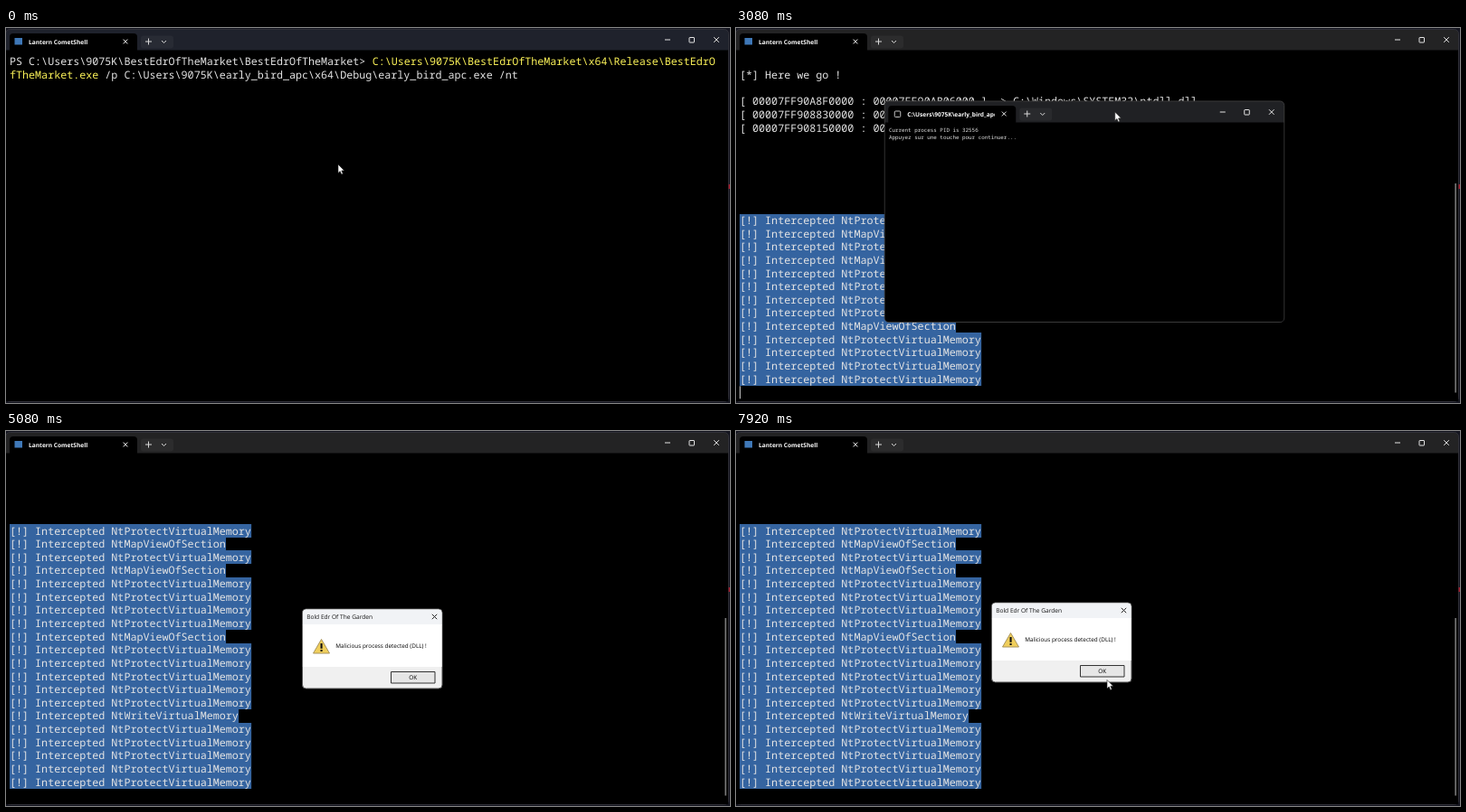
Recreate the animation shown at these times as an HTML page with a canvas. Size 800 by 415 pixels, loop 8000 ms.

```html
<!DOCTYPE html>
<html lang="en">
<head>
<meta charset="utf-8">
<title>Terminal session</title>
<style>
  html, body { margin: 0; width: 100%; height: 100%; overflow: hidden; background: #000; }
  canvas { display: block; width: 800px; height: 415px; }
</style>
</head>
<body>
<canvas id="stage"></canvas>
<script type="text/plain" id="log">
PS C:\Users\9075K\BestEdrOfTheMarket\BestEdrOfTheMarket> C:\Users\9075K\BestEdrOfTheMarket\x64\Release\BestEdrO
fTheMarket.exe /p C:\Users\9075K\early_bird_apc\x64\Debug\early_bird_apc.exe /nt
[*] Spawning C:\Users\9075K\early_bird_apc\x64\Debug\early_bird_apc.exe ...
 ____        _     _   _____ ____  ____     ___   __   _____ _
| __ )  ___ | | __| | | ____|  _ \|  _ \   / _ \ / _| |_   _| |__   ___
|  _ \ / _ \| |/ _` | |  _| | | | | |_) | | | | | |_    | | | '_ \ / _ \
| |_) | (_) | | (_| | | |___| |_| |  _ <  | |_| |  _|   | | | | | |  __/
|____/ \___/|_|\__,_|_|_____|____/|_| \_\  \___/|_|     |_| |_| |_|\___|     1.1.0
 / ___| __ _ _ __ __| | ___ _ __
| |  _ / _` | '__/ _` |/ _ \ '_ \
| |_| | (_| | | | (_| |  __/ | | |        Tavorin - github.com/Mivelo
 \____|\__,_|_|  \__,_|\___|_| |_|

                        My PID is 32540
[*] Successfully parsed YaroRules.json

[*] Here we go !

[ 00007FF90A8F0000 : 00007FF90AB06000 ] -> C:\Windows\SYSTEM32\ntdll.dll
[ 00007FF908830000 : 00007FF9088F4000 ] -> C:\Windows\System32\KERNEL32.DLL
[ 00007FF908150000 : 00007FF9084F7000 ] -> C:\Windows\System32\KERNELBASE.dll
</script>
<script>
const LOOP = 8000, STEP = 1000 / 12;
const COL = 7.03, ROW = 14.64, LEFT = 4, FIRST_Y = 37.3;
const MONO = '"Noto Sans Mono", monospace', SANS = '"Open Sans", sans-serif';
const LOG_FONT = `500 ${COL / 0.6}px ${MONO}`;
const FOCUSED = '#1f222c', UNFOCUSED = '#232324';

const calls = { P: 'NtProtectVirtualMemory', M: 'NtMapViewOfSection', W: 'NtWriteVirtualMemory' };
const lines = document.getElementById('log').textContent.replace(/^\n|\n$/g, '').split('\n');
while (lines.length < 27) lines.push('');
for (const c of 'PMPMPPPPMPPPPPWPPPPP') lines.push('[!] Intercepted ' + calls[c]);

// [time, number of printed lines]
const OUTPUT = [[0, 2], [580, 3], [1000, 18], [1170, 21], [1840, 32], [2000, 40], [4000, 42], [4080, 47]];
// [time, x, y]
const CONSOLE_PATH = [[2750, 45.5, 46], [3250, 283, 116]];
const DIALOG_PATH = [[6250, 327.5, 197], [6600, 282.5, 190]];
const POINTER_PATHS = [
  { from: 0, to: 580, path: [[0, 367, 151]] },
  { from: 2000, to: 4000, path: [[2000, 330, 150], [2250, 284.5, 89], [2450, 284.5, 89],
    [2750, 300, 58], [3250, 537.5, 128], [3600, 478, 249]] },
  { from: 6000, to: LOOP, path: [[6000, 405, 225], [6250, 400, 205], [6600, 355, 198],
    [6850, 355, 198], [7400, 410, 275.5]] }
];

const canvas = document.getElementById('stage');
const ctx = canvas.getContext('2d');
const ratio = window.devicePixelRatio || 1;
canvas.width = 800 * ratio;
canvas.height = 415 * ratio;
ctx.scale(ratio, ratio);
ctx.textRendering = 'geometricPrecision';

function follow(path, t) {
  const next = path.findIndex(p => p[0] > t);
  if (next === 0) return path[0].slice(1);
  if (next < 0) return path[path.length - 1].slice(1);
  const [t0, x0, y0] = path[next - 1], [t1, x1, y1] = path[next];
  const u = (t - t0) / (t1 - t0), k = u * u * (3 - 2 * u);
  return [x0 + (x1 - x0) * k, y0 + (y1 - y0) * k];
}

function rect(x, y, w, h, fill) {
  ctx.fillStyle = fill;
  ctx.fillRect(x, y, w, h);
}

function rounded(x, y, w, h, radius, fill, stroke) {
  ctx.beginPath();
  ctx.roundRect(x, y, w, h, radius);
  if (fill) { ctx.fillStyle = fill; ctx.fill(); }
  if (stroke) { ctx.strokeStyle = stroke; ctx.lineWidth = 1; ctx.stroke(); }
}

function text(s, x, y, font, fill) {
  ctx.font = font;
  ctx.fillStyle = fill;
  ctx.fillText(s, x, y);
}

// Each argument after the colour is a polyline: [x, y, x, y, ...]
function strokes(color, ...polylines) {
  ctx.beginPath();
  for (const p of polylines)
    for (let i = 0; i < p.length; i += 2) ctx[i ? 'lineTo' : 'moveTo'](p[i], p[i + 1]);
  ctx.strokeStyle = color;
  ctx.lineWidth = 1;
  ctx.stroke();
}

function cross(x, y, r, color) {
  strokes(color, [x - r, y - r, x + r, y + r], [x + r, y - r, x - r, y + r]);
}

// Tab strip and caption buttons; x, y is the window's corner
function titleBar(x, y, width, title, drawIcon) {
  rounded(x + 4, y + 4.5, 141, 20, [4, 4, 0, 0], '#000');
  drawIcon(x + 9.5, y + 9.5);
  ctx.save();
  ctx.beginPath();
  ctx.rect(x, y, 121.5, 24);
  ctx.clip();
  text(title, x + 25, y + 16.4, `700 6.6px ${SANS}`, '#fff');
  ctx.restore();
  cross(x + 132, y + 13.5, 2.4, '#e4e4e4');
  rounded(x + 149, y + 7, 36, 14, 3, '#ffffff0a');
  strokes('#d8d8d8', [x + 154, y + 13.5, x + 161, y + 13.5], [x + 157.5, y + 10, x + 157.5, y + 17]);
  strokes('#d8d8d8', [x + 172, y + 12.5, x + 174.5, y + 15, x + 177, y + 12.5]);
  const right = x + width;
  strokes('#e4e4e4', [right - 71, y + 11.5, right - 65, y + 11.5]);
  rounded(right - 44, y + 9, 5.5, 5.5, 0.5, null, '#e4e4e4');
  cross(right - 14, y + 11.5, 2.8, '#e4e4e4');
}

function terminal(t) {
  const focused = t < 1420 || (t >= 3920 && t < 4830);
  rect(0, 0, 800, 415, '#14151f');
  rounded(-0.5, 1.5, 799, 412, 5, focused ? FOCUSED : UNFOCUSED, '#303038');
  rect(0, 24.5, 798, 388.5, '#000');
  titleBar(0, 1.5, 799, 'Lantern CometShell', (x, y) => rect(x, y, 8.5, 7.5, '#3f78b8'));
  rect(798.5, 173, 1.5, 5, '#a01c2c');

  const count = OUTPUT.filter(o => o[0] <= t).pop()[1];
  const scroll = Math.max(0, count - 25);
  for (let i = scroll; i < count; i++) {
    const y = FIRST_Y + (i - scroll) * ROW, line = lines[i];
    if (i >= 27) {
      const top = Math.round(y - 7.3);
      rect(LEFT, top, line.length * COL, Math.round(y - 7.3 + ROW) - top, '#3564a0');
    }
    text(line, LEFT, y + 4, LOG_FONT, '#e4e4e4');
  }
  if (!scroll) {
    const command = (row, start, end) => {
      const x = LEFT + start * COL, y = FIRST_Y + row * ROW;
      rect(x, y - 7, (end - start) * COL, 14, '#000');
      text(lines[row].slice(start, end), x, y + 4, LOG_FONT, '#fbf258');
    };
    command(0, 57, 111);
    command(1, 0, 14);
  }
  if (t >= 580 && t < 4830) rect(4, FIRST_Y + (count - scroll) * ROW - 7, 1, 14, '#c8c8c8');
  if (scroll) {
    const top = scroll > 17 ? 207 : 172;
    rect(794.5, top, 1.2, 403.5 - top, '#a0a0a0');
  }
}

function childConsole(t) {
  const [x, y] = follow(CONSOLE_PATH, t);
  rounded(x, y, 441.5, 244.5, 4.5, '#202124', '#3a3a3a');
  rounded(x + 0.5, y + 23.5, 440.5, 220.5, [0, 0, 4, 4], '#000');
  titleBar(x, y + 0.5, 441.5, 'C:\\Users\\9075K\\early_bird_apc\\x64',
    (ix, iy) => rounded(ix + 1.5, iy + 1, 6.5, 6.5, 1, null, '#c4c4c4'));
  const font = `500 5.88px ${MONO}`;
  text('Current process PID is 32556', x + 4.7, y + 34.3, font, '#e4e4e4');
  text('Appuyez sur une touche pour continuer...', x + 4.7, y + 41.5, font, '#e4e4e4');
  if (Math.floor((t + 300) / 530) % 2) rect(x + 149, y + 35.5, 0.9, 7, '#ddd');
}

function dialog(t) {
  const [x, y] = follow(DIALOG_PATH, t);
  rounded(x, y, 154.5, 88, 4, '#f0f0f0', '#555');
  rounded(x + 0.4, y + 0.4, 153.7, 17, [4, 4, 0, 0], '#f1f3f6');
  rect(x + 0.4, y + 17, 153.7, 47, '#fff');
  text('Bold Edr Of The Garden', x + 4.7, y + 11.2, `6.6px ${SANS}`, '#111');
  cross(x + 146, y + 8.5, 2.7, '#222');

  ctx.beginPath();
  ctx.moveTo(x + 21, y + 33.5);
  ctx.lineTo(x + 30, y + 49);
  ctx.lineTo(x + 12, y + 49);
  ctx.closePath();
  ctx.lineJoin = 'round';
  ctx.fillStyle = '#f0cf5c';
  ctx.fill();
  ctx.strokeStyle = '#a8935c';
  ctx.lineWidth = 1;
  ctx.stroke();
  rect(x + 20, y + 38, 2.1, 5.8, '#111');
  rect(x + 20, y + 45, 2.1, 2, '#111');

  text('Malicious process detected (DLL) !', x + 36.7, y + 43.3, `500 6.4px ${SANS}`, '#000');
  rounded(x + 98, y + 69.5, 48.5, 12.5, 0, '#e6e6e6', '#333');
  ctx.textAlign = 'center';
  text('OK', x + 122.3, y + 78, `500 6.4px ${SANS}`, '#000');
  ctx.textAlign = 'left';
}

function spinner(t) {
  const a = t / 160;
  const arc = (start, end, color) => {
    ctx.beginPath();
    ctx.arc(477.3, 249.2, 4.8, start, end);
    ctx.strokeStyle = color;
    ctx.lineWidth = 2.4;
    ctx.stroke();
  };
  arc(0, Math.PI * 2, '#4b86d2');
  arc(a, a + 1.8, '#a9cbf0');
}

function pointer(x, y) {
  const shape = [0, 0, 0, 9.4, 2.2, 7.5, 3.7, 11, 5.3, 10.3, 3.8, 6.9, 6.7, 6.7];
  ctx.beginPath();
  for (let i = 0; i < shape.length; i += 2) ctx.lineTo(x + shape[i], y + shape[i + 1]);
  ctx.closePath();
  ctx.fillStyle = '#fff';
  ctx.fill();
  ctx.strokeStyle = '#222';
  ctx.lineWidth = 0.6;
  ctx.stroke();
}

function draw(now) {
  const t = Math.floor((now % LOOP) / STEP + 1e-6) * STEP;
  terminal(t);
  if (t >= 1420 && t < 3920) childConsole(t);
  if (t >= 4830) dialog(t);
  if (t >= 4000 && t < 4830) spinner(t);
  const active = POINTER_PATHS.find(p => t >= p.from && t < p.to);
  if (active) pointer(...follow(active.path, t));
  requestAnimationFrame(() => draw(performance.now() - start));
}

const start = performance.now();
draw(0);
</script>
</body>
</html>
```
